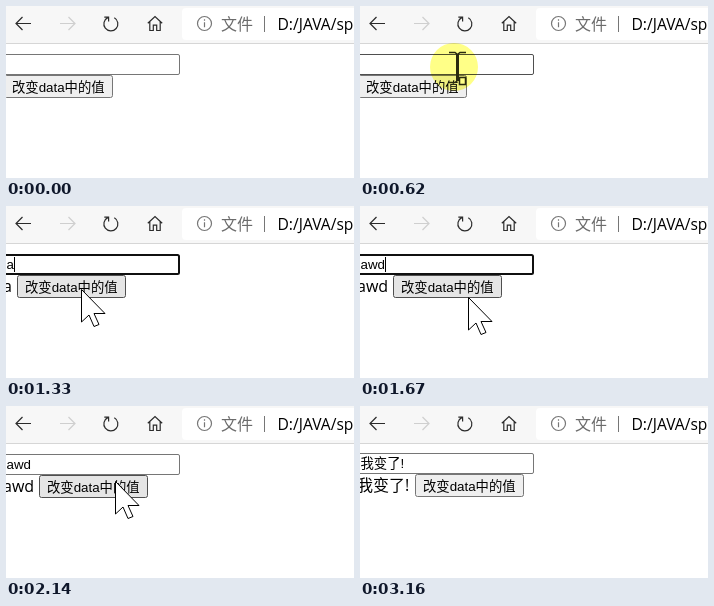
Write an HTML page that moves like this. It is 348 by 172 pixels and loops after 4 s.

```html
<!DOCTYPE html>
<html lang="zh-CN">
<head>
<meta charset="utf-8">
<title>data</title>
<style>
html, body { margin: 0; width: 100%; height: 100%; overflow: hidden; background: #fff; }
svg { display: block; width: 100vw; height: 100vh; }
text { white-space: pre; }
.ui { font: 16px "Open Sans", "Noto Sans CJK SC", "Noto Sans CJK", sans-serif; }
.control { font: 13.333px "Liberation Sans", "Noto Sans CJK SC", "Noto Sans CJK", sans-serif; }
.address { font-size: 15.6px; }
.icon { fill: none; stroke: #2b2b2b; stroke-width: 1.2; }
.off { stroke: #cfcfcf; }
.info { stroke: #767676; }
#ring { fill: #ffff87; mix-blend-mode: multiply; }
</style>
</head>
<body>
<svg viewBox="0 0 348 172">
  <rect width="348" height="172" fill="#fff"/>
  <rect width="348" height="38" fill="#f7f7f7"/>
  <rect y="37" width="348" height="1" fill="#d6d6d6"/>
  <rect x="176" y="2" width="200" height="32" rx="4" fill="#fff"/>
  <g class="icon">
    <path d="M25 17.5H10M16.5 11L10 17.5L16.5 24"/>
    <path class="off" d="M54 17.5H69M62.5 11L69 17.5L62.5 24"/>
    <path d="M101.8 11.6A7 7 0 1 0 108.3 11.8M98.3 11.2H102.6V15.5"/>
    <path d="M141.8 17.3L149 10.6L156.2 17.3M143.8 15.5V24.5H147.3V19.2H150.7V24.5H154.2V15.5"/>
    <g class="info">
      <circle cx="198.5" cy="17.5" r="7"/>
      <path d="M198.5 16.3V21.3M198.5 13.3V14.8"/>
      <path d="M258.5 10V26" stroke-width="1"/>
    </g>
  </g>
  <text class="ui" x="215" y="23.5" fill="#6b6b6b">文件</text>
  <text class="ui address" x="271.5" y="23.5">D:/JAVA/sp</text>

  <g id="page">
    <rect id="field" x="-8" rx="1.5" fill="#fff"/>
    <text id="value" class="control" x="0.5" y="63"></text>
    <path id="caret" stroke="#000"/>
    <text id="echo" class="ui" x="-3" y="86"></text>
    <g id="button">
      <rect id="face" x="0.5" y="69.5" width="108" height="22" rx="2"/>
      <text class="control" x="8" y="86">改变data中的值</text>
    </g>
  </g>

  <path id="arrow" d="M0 0V32.5L7.5 25.5L12.5 37L17.5 35L12.5 24H23.5Z" fill="#fff" stroke="#000"/>
  <g id="beam" fill="none" stroke="#2a2a1c">
    <path d="M3 -13.5V13.5" stroke-width="3"/>
    <path d="M-5.5 -15H0.5L3 -13L5.5 -15H11.5M-5.5 15H0.5L3 13" stroke-width="1.6"/>
    <rect x="5" y="10" width="6" height="7" fill="#fff" stroke-width="1.5"/>
  </g>
  <circle id="ring" r="24"/>
</svg>
<script>
const LOOP = 4000, TICK = 75;
const el = {};
document.querySelectorAll('[id]').forEach(n => el[n.id] = n);

const entry = { x: 215, y: 180 };
// Each glide runs from the previous place to x, y, one hop per tick
const glides = [
  { from: 70, to: 220, x: 100, y: 72 },
  { from: 390, to: 540, x: 94, y: 61 },
  { from: 800, to: 920, x: 81, y: 77 },
  { from: 1030, to: 1250, x: 75, y: 83 },
  { from: 1640, to: 1800, x: 173, y: 106 },
  { from: 2050, to: 2140, x: 109, y: 75 },
  { from: 2530, to: 2750, x: 113, y: 79 },
  { from: 3070, to: 3070, x: 115, y: 92 }
];
const typed = 'awd', keyTimes = [1330, 1480, 1560];

const within = (t, from, to) => t >= from && t < to;

function pointerAt(t) {
  let p = entry;
  for (const g of glides) {
    if (t < g.from) break;
    const hops = Math.round((g.to - g.from) / TICK);
    const hop = t >= g.to ? hops : Math.floor((t - g.from) / (g.to - g.from) * hops);
    const k = (hop + 1) / (hops + 1);
    p = { x: p.x + (g.x - p.x) * k, y: p.y + (g.y - p.y) * k };
  }
  return { x: Math.round(p.x), y: Math.round(p.y) };
}

function set(node, attrs) {
  for (const key in attrs) node.setAttribute(key, attrs[key]);
}
const show = (node, on) => node.style.display = on ? '' : 'none';

function draw(t) {
  const { x, y } = pointerAt(t);
  const visible = within(t, 70, 3160);
  const focus = within(t, 750, 1890);
  const clicking = within(t, 620, 800) || within(t, 1890, 1970) || within(t, 2290, 2380);
  const changed = t >= 2380;
  const text = changed ? '我变了!' : typed.slice(0, keyTimes.filter(k => t >= k).length);

  el.value.textContent = el.echo.textContent = text;
  const left = text ? Math.round(el.echo.getComputedTextLength() + 2.28) : -2;
  const overField = visible && within(y, 48, 69) && x < 174;
  const overButton = visible && within(y, 69, 92) && within(x, left, left + 109);

  set(el.page, { transform: `translate(0 ${changed ? -1 : 0})` });
  set(el.field, focus
    ? { y: 49, width: 181, height: 19, stroke: '#101010', 'stroke-width': 2 }
    : { y: 48.5, width: 181.5, height: 20, stroke: overField ? '#4f4f4f' : '#767676', 'stroke-width': 1 });
  const caretX = Math.round(el.value.getComputedTextLength()) + 1.5;
  set(el.caret, { d: `M${caretX} 51V66` });
  show(el.caret, focus);

  set(el.button, { transform: `translate(${left} 0)` });
  set(el.face, overButton
    ? { fill: '#e5e5e5', stroke: '#4f4f4f' }
    : { fill: '#efefef', stroke: '#767676' });

  for (const node of [el.arrow, el.beam]) set(node, { transform: `translate(${x + 0.5} ${y + 0.5})` });
  show(el.arrow, visible && !overField);
  show(el.beam, overField);
  set(el.ring, { cx: x, cy: y });
  show(el.ring, clicking);
}

const start = performance.now();
function tick() {
  draw((performance.now() - start) % LOOP);
  requestAnimationFrame(tick);
}
tick();
</script>
</body>
</html>
```
